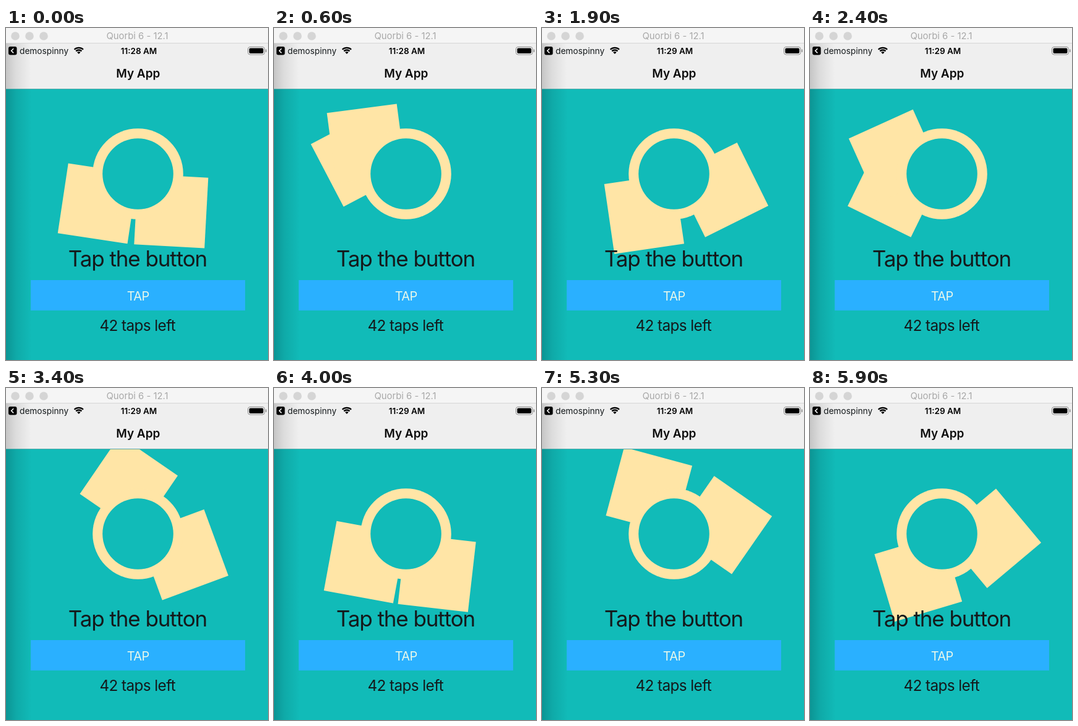
An HTML page with a canvas for the animation above (6000 ms loop, 424 by 536 pixels).

```html
<!DOCTYPE html>
<html lang="en">
<head>
<meta charset="utf-8">
<title>My App</title>
<style>
  html, body { margin: 0; width: 100%; height: 100%; overflow: hidden; background: #11bbb8; }
  canvas { display: block; }
</style>
</head>
<body>
<canvas id="stage" width="424" height="536"></canvas>
<script>
const ctx = document.getElementById('stage').getContext('2d');

const LOOP = 6000, STEP = 100, TURN = 2000;
const CX = 213.5, CY = 235.5, SIDE = 114;
const TEAL = '#11bbb8', CREAM = '#ffe5a6', INK = '#14191b';

const DRIFT = [[0, 0], [2400, 6], [3400, 22], [4600, 0], [6000, -43]];

function drift(t) {
  const i = DRIFT.findIndex(([end]) => t < end);
  const [t0, a] = DRIFT[i - 1], [t1, b] = DRIFT[i];
  return a + (b - a) * (t - t0) / (t1 - t0);
}

// Cubic Bezier easing with handles at (x1, 0) and (x2, 1).
function ease(x, x1, x2) {
  let lo = 0, hi = 1;
  for (let i = 0; i < 24; i++) {
    const s = (lo + hi) / 2, r = 1 - s;
    if (3 * r * r * s * x1 + 3 * r * s * s * x2 + s * s * s < x) lo = s;
    else hi = s;
  }
  return lo * lo * (3 - 2 * lo);
}

const easeInOut = x => ease(x, 0.42, 0.58);

// Starts with a straight handle at the origin, so it leaves at full speed.
const easeOut = x => ease(x, 0, 0.58);

const progress = (t, start) => ((t - start + TURN) % TURN) / TURN;

function rect(x, y, w, h, color) {
  ctx.fillStyle = color;
  ctx.fillRect(x, y, w, h);
}

function disc(x, y, r, color) {
  ctx.fillStyle = color;
  ctx.beginPath();
  ctx.arc(x, y, r, 0, Math.PI * 2);
  ctx.fill();
}

function box(x, y, w, h, r) {
  ctx.beginPath();
  ctx.roundRect(x, y, w, h, r);
}

function label(text, x, y, size, { color = INK, weight = 400, align = 'center', spacing = 0 } = {}) {
  ctx.font = `${weight} ${size}px Inter, Roboto, sans-serif`;
  ctx.letterSpacing = spacing + 'px';
  ctx.textAlign = align;
  ctx.fillStyle = color;
  ctx.fillText(text, x, y);
}

// A square hinged at the ring's centre, at rest up and to the left.
function square(turn) {
  ctx.save();
  ctx.translate(CX, CY);
  ctx.rotate(turn * Math.PI * 2);
  rect(-SIDE, -SIDE, SIDE, SIDE, CREAM);
  ctx.restore();
}

function spinner(t) {
  square(easeInOut(progress(t, 990)));
  square(easeOut(progress(t, 824)));
  disc(CX, CY, 73.3, CREAM);
  disc(CX, CY, 57.3, TEAL);
}

function edgeShade(y, h, width, color, alpha) {
  const g = ctx.createLinearGradient(0, 0, width, 0);
  g.addColorStop(0, `rgba(${color},${alpha})`);
  g.addColorStop(0.4, `rgba(${color},${alpha * 0.45})`);
  g.addColorStop(1, `rgba(${color},0)`);
  rect(0, y, width, h, g);
}

function wifi(x, y) {
  ctx.strokeStyle = '#000';
  ctx.lineWidth = 2.3;
  for (const r of [10.2, 6.5]) {
    ctx.beginPath();
    ctx.arc(x, y, r, Math.PI * 1.25, Math.PI * 1.75);
    ctx.stroke();
  }
  ctx.fillStyle = '#000';
  ctx.beginPath();
  ctx.moveTo(x, y);
  ctx.arc(x, y, 3.8, Math.PI * 1.25, Math.PI * 1.75);
  ctx.fill();
}

function backIcon() {
  ctx.fillStyle = '#000';
  box(4, 30, 13.5, 13.5, 3);
  ctx.fill();
  ctx.strokeStyle = '#fff';
  ctx.lineWidth = 1.5;
  ctx.beginPath();
  ctx.moveTo(12.2, 33.2);
  ctx.lineTo(8.6, 36.8);
  ctx.lineTo(12.2, 40.4);
  ctx.stroke();
}

function battery() {
  ctx.strokeStyle = '#8d8d8d';
  ctx.lineWidth = 1;
  box(391.5, 30.5, 27, 12.5, 3.5);
  ctx.stroke();
  ctx.fillStyle = '#000';
  box(393.5, 32.5, 23, 8.5, 2);
  ctx.fill();
  rect(420, 34.5, 1.5, 4.5, '#8d8d8d');
}

function header(t) {
  rect(0, 0, 424, 25, '#f5f5f5');
  rect(0, 25, 424, 73, '#efefef');
  rect(0, 24, 424, 1, '#d6d6d6');
  rect(0, 98, 424, 1, '#58a9a8');
  edgeShade(25, 73, 40, '110,110,110', 0.32);

  for (const x of [15, 38, 61]) disc(x, 13, 6.8, '#d5d5d5');
  label('Quorbi 6 - 12.1', 212.5, 18, 14.8, { color: '#a8a8a8' });

  backIcon();
  label('demospinny', 22, 42, 13.7, { align: 'left' });
  wifi(117.8, 42);
  label(t < 1000 ? '11:28 AM' : '11:29 AM', 215, 42, 13.5, { weight: 600, color: '#000' });
  battery();
  label('My App', 213.8, 80, 19, { weight: 600, color: '#0c0c0c' });
}

function draw(t) {
  rect(0, 0, 424, 536, TEAL);
  edgeShade(98, 438, 42, '0,60,65', 0.3);
  spinner(t + drift(t));
  header(t);

  label('Tap the button', 213, 385, 35, { spacing: -1.1 });
  rect(40, 407, 347, 49, '#2ab0ff');
  label('TAP', 213.7, 440, 20, { color: '#e8f8ea', spacing: -0.6 });
  label('42 taps left', 212.8, 489, 24.3, { spacing: -0.6 });
}

const origin = performance.now();

function frame() {
  const t = (performance.now() - origin) % LOOP;
  draw(Math.floor(t / STEP) * STEP);
  requestAnimationFrame(frame);
}

frame();
</script>
</body>
</html>
```
